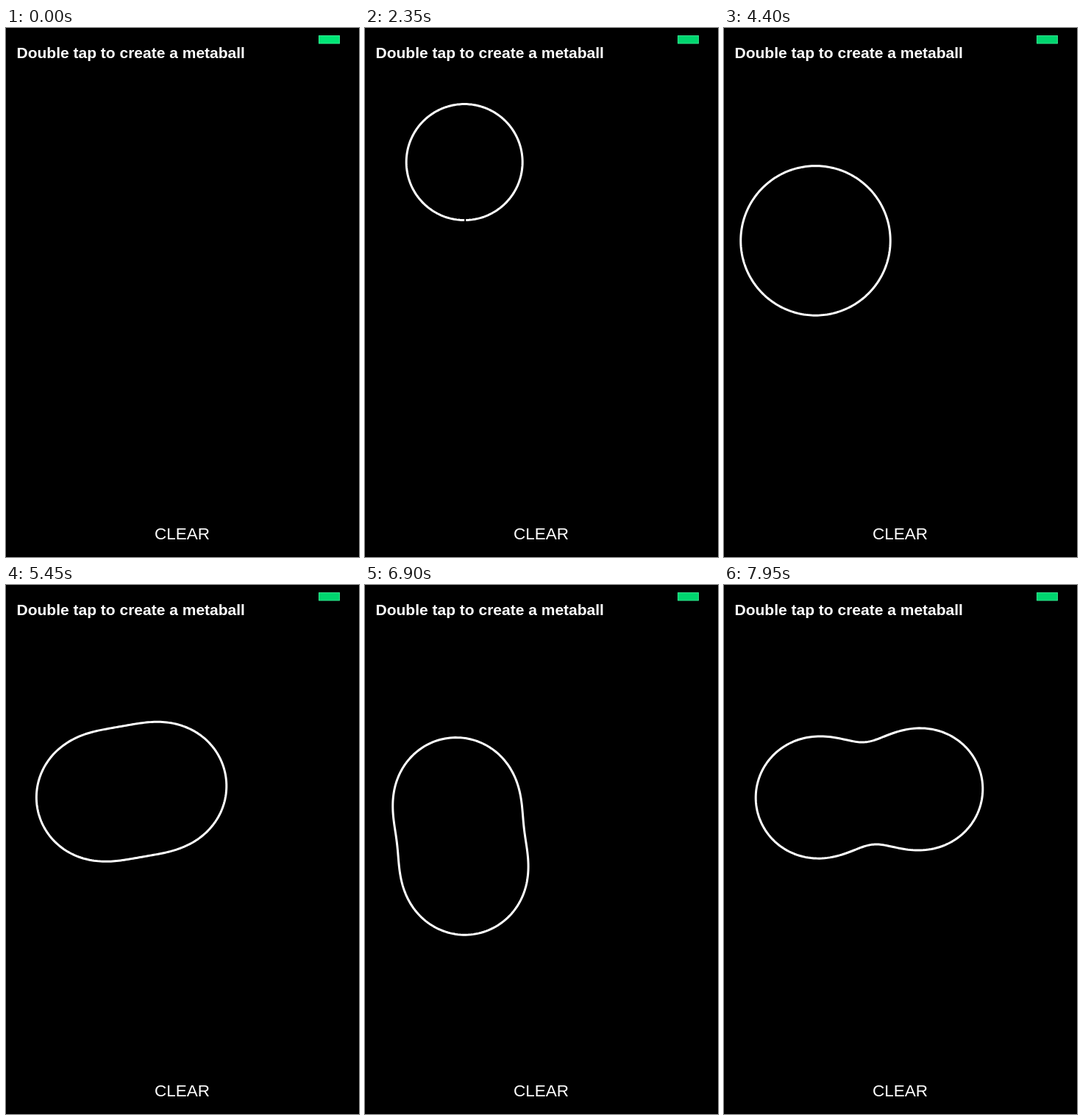
Animation of 480 by 720 pixels, one loop 8 s. Source, as an HTML page with a canvas:

```html
<!DOCTYPE html>
<html lang="en">
<head>
<meta charset="utf-8">
<title>Metaballs</title>
<style>
  html, body { margin: 0; width: 100%; height: 100%; overflow: hidden; background: #000; }
  canvas { display: block; }
</style>
</head>
<body>
<canvas id="stage" width="480" height="720"></canvas>
<script>
const ctx = document.getElementById('stage').getContext('2d');
const LOOP = 8000, STEP = 50;
const RADIUS = 79, FALLOFF = 2.74;

// A drag goes on from where the ball rests, through the given points
const drag = (from, to, ...points) => ({ from, to, points });

const balls = [
  { born: 700, home: [94.5, 309], drags: [
    drag(1650, 2430, [165, 270], [134, 179.5]),
    drag(2500, 3150, [124, 330], [127, 289.5]),
    drag(3500, 3550, [123.8, 289.5])
  ] },
  { born: 3750, home: [122.5, 289.5], drags: [
    drag(4350, 4850, [296.5, 280]),
    drag(5000, 5850, [225, 277], [134, 208]),
    drag(5850, 6100, [136.5, 120]),
    drag(6100, 7070, [128, 300], [137.2, 404.5]),
    drag(7100, 7950, [140, 320], [271.2, 277.5])
  ] }
];

const ease = u => u * u * (3 - 2 * u);

// Catmull-Rom curve through the points, u from 0 to 1
function along(points, u) {
  const last = points.length - 1;
  const i = Math.min(Math.floor(u * last), last - 1), s = u * last - i;
  const at = k => points[Math.max(0, Math.min(last, k))];
  return [0, 1].map(axis => {
    const [a, b, c, d] = [-1, 0, 1, 2].map(k => at(i + k)[axis]);
    return b + s / 2 * (c - a + s * (2 * a - 5 * b + 4 * c - d + s * (3 * (b - c) + d - a)));
  });
}

function position(ball, t) {
  let rest = ball.home;
  for (const { from, to, points } of ball.drags) {
    if (t < from) break;
    if (t < to) return along([rest, ...points], ease((t - from) / (to - from)));
    rest = points[points.length - 1];
  }
  return rest;
}

function field(centres, x, y) {
  return centres.reduce((sum, [cx, cy]) =>
    sum + Math.pow(RADIUS / (Math.hypot(x - cx, y - cy) + 1e-6), FALLOFF), 0);
}

// Trace the outline by bisecting along rays from the middle of the balls
function drawOutline(centres) {
  const [mx, my] = [0, 1].map(axis =>
    centres.reduce((sum, c) => sum + c[axis], 0) / centres.length);
  const rays = 240, gap = centres.length === 1 ? 0.026 : 0;
  ctx.beginPath();
  for (let i = 0; i <= rays; i++) {
    const angle = Math.PI / 2 + (2 * Math.PI - gap) * i / rays;
    const dx = Math.cos(angle), dy = Math.sin(angle);
    let near = 0, far = 300;
    for (let n = 0; n < 16; n++) {
      const r = (near + far) / 2;
      if (field(centres, mx + dx * r, my + dy * r) > 1) near = r; else far = r;
    }
    ctx.lineTo(mx + dx * near, my + dy * near);
  }
  if (!gap) ctx.closePath();
  ctx.strokeStyle = '#fff';
  ctx.lineWidth = 3;
  ctx.lineJoin = 'round';
  ctx.stroke();
}

function drawBadge(color) {
  ctx.fillStyle = color;
  ctx.fillRect(425, 10, 29, 11.5);
  ctx.strokeStyle = 'rgba(255, 255, 255, 0.2)';
  ctx.lineWidth = 1;
  ctx.strokeRect(425.5, 10.5, 28, 10.5);
}

function label(text, font, x, y, align) {
  ctx.font = font + ' "Liberation Sans", Arial, sans-serif';
  ctx.textAlign = align;
  ctx.fillStyle = '#fff';
  ctx.fillText(text, x, y);
}

function draw(t) {
  ctx.fillStyle = '#000';
  ctx.fillRect(0, 0, 480, 720);
  drawBadge(t < 450 ? '#00e676' : '#00d66f');
  label('Double tap to create a metaball', 'bold 21px', 14.5, 41, 'left');
  label('CLEAR', '22.5px', 239.5, 695.5, 'center');
  const centres = balls.filter(b => t >= b.born).map(b => position(b, t));
  if (centres.length) drawOutline(centres);
}

const start = performance.now();
function tick() {
  const t = (performance.now() - start) % LOOP;
  draw(Math.floor(t / STEP) * STEP);
  requestAnimationFrame(tick);
}
tick();
</script>
</body>
</html>
```
